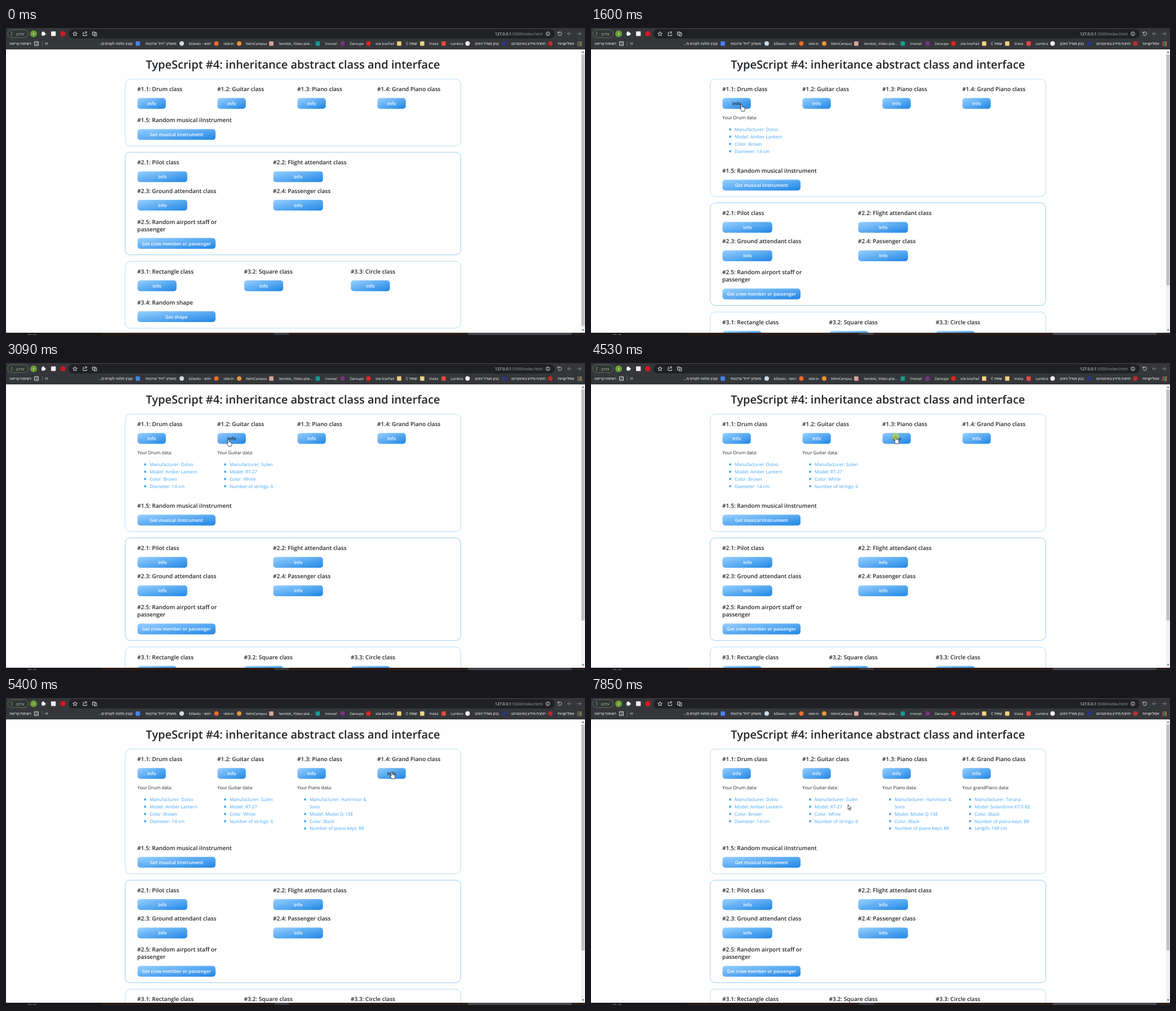
These frames come from a looping animation (1028x545 px, 8 s). An HTML page:

```html
<!DOCTYPE html>
<html lang="en">
<head>
<meta charset="utf-8">
<title>Inheritance, abstract class and interface</title>
<style>
  html, body { margin: 0; width: 100%; height: 100%; overflow: hidden; background: #fefefe; }
  svg { display: block; width: 1028px; height: 545px; }
  text { font-family: "Open Sans", "Liberation Sans", sans-serif; text-rendering: geometricPrecision; white-space: pre; }
  .title { font-size: 20.05px; font-weight: 600; fill: #212529; text-anchor: middle; }
  .head { font-size: 10.1px; font-weight: 600; fill: #212529; }
  .body { font-size: 8.05px; fill: #212529; }
  .item { font-size: 8.1px; fill: #42a5f5; }
  .label { font-size: 8.1px; font-weight: 600; fill: #fff; text-anchor: middle; }
  .bar { font-size: 6.15px; fill: #fff; text-anchor: middle; }
  .rtl { font-size: 6.7px; direction: rtl; }
  .url { font-size: 7px; fill: #fff; }
  .card { fill: #fff; stroke: #a4d6fa; stroke-width: 0.8; }
  .line { fill: none; stroke: #dadce0; stroke-width: 1; }
</style>
</head>
<body>
<svg id="stage" viewBox="0 0 1028 545">
  <defs>
    <linearGradient id="blue" x2="1" y2="1">
      <stop stop-color="#98d0ff"/><stop offset="1" stop-color="#1f86e5"/>
    </linearGradient>
    <linearGradient id="hover" x2="1" y2="1">
      <stop stop-color="#8fcafd"/><stop offset="1" stop-color="#1f84e2"/>
    </linearGradient>
  </defs>
</svg>
<script>
const LOOP = 8000;
const stage = document.getElementById('stage');

function el(parent, tag, attrs = {}, content) {
  const node = document.createElementNS('http://www.w3.org/2000/svg', tag);
  for (const key in attrs) node.setAttribute(key, attrs[key]);
  if (content) node.textContent = content;
  return parent.appendChild(node);
}
const group = () => el(stage, 'g');
const text = (parent, cls, x, y, str, more) => el(parent, 'text', { class: cls, x, y, ...more }, str);
const rect = (parent, x, y, width, height, fill, rx = 0) =>
  el(parent, 'rect', { x, y, width, height, fill, rx });
const dot = (parent, cx, cy, r, fill) => el(parent, 'circle', { cx, cy, r, fill });
const line = (parent, d, more) => el(parent, 'path', { class: 'line', d, ...more });
const card = (parent, y, height, more) =>
  el(parent, 'rect', { class: 'card', x: 211.6, y, width: 595.8, height, rx: 9, ...more });

// Page
const CARD = 118.6;
const upper = group(), lower = group();
const firstCard = card(upper, 90.8, CARD);
const buttons = [];

function button(parent, x, y, w, label) {
  const face = rect(parent, x, y, w, 19.2, 'url(#blue)', 5);
  const caption = text(parent, 'label', x + w / 2, y + 12.8, label);
  buttons.push({ x, y, w, face, caption, moves: parent === lower });
}
function entry(parent, x, y, title, w, label = 'Info') {
  const lines = title.split('|');
  lines.forEach((str, i) => text(parent, 'head', x - 0.4, y + i * 13, str));
  button(parent, x, y + 12.2 + (lines.length - 1) * 13, w, label);
}

text(upper, 'title', 509.5, 72, 'TypeScript #4: inheritance abstract class and interface');
['Drum', 'Guitar', 'Piano', 'Grand Piano'].forEach((name, i) =>
  entry(upper, 233.5 + i * 142, 112, `#1.${i + 1}: ${name} class`, 50.3));

card(lower, 220.7, 182, { style: 'stroke:#80c2f2' });
card(lower, 414.3, CARD);
entry(lower, 233.5, 167.2, '#1.5: Random musical iInstrument', 138.5, 'Get musical iInstrument');
['Pilot', 'Flight attendant', 'Ground attendant', 'Passenger'].forEach((name, i) =>
  entry(lower, 233.5 + (i % 2) * 241, 242.2 + (i >> 1) * 50.5, `#2.${i + 1}: ${name} class`, 88.3));
entry(lower, 233.5, 347.6, '#2.5: Random airport staff or|passenger', 138.5, 'Get crew member or passenger');
['Rectangle', 'Square', 'Circle'].forEach((name, i) =>
  entry(lower, 233.5 + i * 189.4, 435.8, `#3.${i + 1}: ${name} class`, 69.3));
entry(lower, 233.5, 490.6, '#3.4: Random shape', 138.5, 'Get shape');

// Data lists, shown after each click; "|" wraps a line
const LINE = 12.86;
const details = [
  [1600, 'Drum', ['Manufacturer: Dolvo', 'Model: Amber Lantern', 'Color: Brown', 'Diameter: 14 cm']],
  [3010, 'Guitar', ['Manufacturer: Sulen', 'Model: RT-27', 'Color: White', 'Number of strings: 6']],
  [4590, 'Piano', ['Manufacturer: Hartmoor &|Sons', 'Model: Model Q-138', 'Color: Black', 'Number of piano keys: 88']],
  [5930, 'grandPiano', ['Manufacturer: Toruna', 'Model: Solandrine KT-5 B2', 'Color: Black', 'Number of piano keys: 88', 'Length: 149 cm']]
].map(([at, name, items], col) => {
  const list = group(), x = 233.3 + col * 142;
  let y = 183;
  text(list, 'body', x, 161.8, `Your ${name} data:`);
  for (const item of items) {
    rect(list, x + 12, y - 4.6, 3.5, 3.5, '#42a5f5');
    for (const str of item.split('|')) {
      text(list, 'item', x + 21.6, y, str);
      y += LINE;
    }
  }
  return { at, list };
});

// Scroll bar and task bar
const frame = group();
rect(frame, 1021, 38, 7, 503, '#f1f1f1');
const thumb = rect(frame, 1021.5, 47, 6, 482, '#c1c1c1');
el(frame, 'path', { d: 'M1022.6 44L1024.6 41.6L1026.6 44Z', fill: '#505050' });
el(frame, 'path', { d: 'M1022.6 535L1024.6 537.4L1026.6 535Z', fill: '#505050' });
[[0, '#17181b'], [170, '#2b1c17'], [476, '#3b3a3c'], [502, '#2c1d18'], [820, '#43464c'], [1004, '#2a211f']]
  .forEach(([x, fill]) => rect(frame, x, 541, 1028 - x, 4, fill));
text(frame, 'bar', 46, 548.4, '20:40');

// Browser bars
rect(frame, 0, 0, 1028, 38, '#35363a');
rect(frame, 111, 2, 863, 16.5, '#202124', 8);
el(frame, 'rect', { x: 3, y: 3, width: 36.5, height: 14, rx: 7, fill: '#303633', stroke: '#6d7c73', 'stroke-width': 0.8 });
[7.5, 10.2, 12.9].forEach(y => dot(frame, 10, y, 0.7, '#dadce0'));
text(frame, 'bar rtl', 25.5, 12.5, 'עדכון', { style: 'fill:#b4bcb7' });
dot(frame, 49, 10.3, 6, '#689f38');
text(frame, 'bar', 49, 12.4, 'ג');
rect(frame, 63.2, 7.6, 5.8, 5.8, '#f1f3f4', 0.8);
dot(frame, 66, 7.3, 1.4, '#f1f3f4');
dot(frame, 69.2, 10.5, 1.4, '#f1f3f4');
rect(frame, 80, 6, 8.3, 8.3, '#f3efed', 1);
dot(frame, 101, 10.2, 4.6, '#d8171e');
line(frame, 'M122.5 6.3L123.6 9L126.4 9.2L124.2 11L124.9 13.8L122.5 12.3L120.1 13.8L120.8 11L118.6 9.2L121.4 9Z', { 'stroke-width': 0.8 });
line(frame, 'M137 8V13.5H143.2V11M137 8H139M140 6.8H143V9.5M143 6.8L139.5 10.6', { 'stroke-width': 0.9 });
line(frame, 'M153.5 7H158V12.5H153.5ZM158 8.5H160.8V14H156M154.8 9.2H156.8', { 'stroke-width': 0.9 });
const url = text(frame, 'url', 868, 12.8);
el(url, 'tspan', {}, '127.0.0.1');
el(url, 'tspan', { fill: '#9aa0a6' }, ':5500/index.html');
line(frame, 'M958.7 10.2a3.3 3.3 0 1 0 6.6 0a3.3 3.3 0 1 0 -6.6 0M962 9.6V12M962 8.2V8.8', { 'stroke-width': 0.8 });
line(frame, 'M980.6 8.2A3.2 3.2 0 1 1 980.2 11.2M980 6.5V9H982.6', { 'stroke-width': 1.1 });
line(frame, 'M1004 10.2H997M1000.2 7L997 10.2L1000.2 13.4', { style: 'stroke:#85888c' });
line(frame, 'M1014 10.2H1021M1017.8 7L1021 10.2L1017.8 13.4', { style: 'stroke:#85888c' });

// Bookmarks: text centre, text, icon centre, icon colour, round icon
const bookmarks = [
  [194.5, 'קובץ מלווה לקורס מ...', 234, '#4285f4'],
  [275, 'מועדון "זית" צרכנות', 312, '#c9dcea', 1],
  [344.5, 'bDesko - ראשי', 373.5, '#ec6b2d', 1],
  [395.5, 'obkrin', 414, '#e99635', 1],
  [444.5, 'VelmCampus', 471, '#d9a59c'],
  [514.5, 'lemdok_ Video plat...', 553.5, '#0f9c95'],
  [577, 'trovnal', 597.5, '#7b2f87', 1],
  [622.5, 'Zanvupe', 643.5, '#e5231d', 1],
  [672.5, 'site boxPad', 698, '#f3d27a'],
  [720, 'שפת C', 739, '#f3d27a'],
  [759.5, 'Vosta', 777, '#e04a3c'],
  [800.5, 'Lumbra', 819.5, '#f4f4f4', 1],
  [853.5, 'בנק מגדל הזהב', 885, '#2d3580', 1],
  [927.5, 'תחנת מידע באינטרנט', 966.5, '#c22a26', 1],
  [994, 'אפליקציות', 1018],
  [25.5, 'רשימת קריאה', 54]
];
for (const [x, str, cx, fill, round] of bookmarks) {
  const rtl = /^[\u0590-\u05ff]/.test(str);
  text(frame, rtl ? 'bar rtl' : 'bar', x, 29.6, str);
  if (!fill) continue;
  if (round) dot(frame, cx, 27.6, 4, fill);
  else rect(frame, cx - 3.8, 23.8, 7.6, 7.6, fill, 0.8);
}
for (let i = 0; i < 9; i++)
  rect(frame, 1014.4 + (i % 3) * 2.8, 24.2 + Math.floor(i / 3) * 2.8, 1.8, 1.8, ['#e8584b', '#58b56b', '#f0c54a'][i % 3]);
line(frame, 'M50.5 24.2H57.5V31H50.5ZM52 26.2H53M54 26.2H56.2M52 29H53M54 29H56.2', { 'stroke-width': 0.9 });
line(frame, 'M64.5 23.5V32', { style: 'stroke:#5f6368', 'stroke-width': 0.7 });
line(frame, 'M71.8 25.6L69.8 27.6L71.8 29.6M74.4 25.6L72.4 27.6L74.4 29.6', { 'stroke-width': 0.9 });

// Pointer
const pointer = group();
const ring = el(pointer, 'circle', { r: 6.4, fill: '#b2d545', opacity: 0.78 });
const ink = { fill: '#fff', stroke: '#111', 'stroke-width': 0.75, 'stroke-linejoin': 'round' };
const arrow = el(pointer, 'path', { d: 'M0.3 0.4V8.9L2.2 7.1L3.5 10.2L4.9 9.6L3.6 6.6H6.1Z', ...ink });
const hand = el(pointer, 'path', {
  d: 'M-1.2 1.2Q0 -.5 1.2 1.2V4.7Q2.6 4 3 5.2Q4.4 4.6 4.6 5.8Q5.8 5.6 5.8 7V9Q5.8 10.8 4.9 12.4H-.2Q-1.4 10 -2.8 8Q-3.4 6.8 -2.4 6.5L-1.2 7.6Z',
  ...ink
});

// Each move: first step, last step, number of steps, end point
const moves = [
  [280, 280, 1, 941, 490],
  [360, 1050, 9, 280, 152],
  [1130, 1210, 2, 270.5, 144],
  [1360, 1510, 3, 267, 135],
  [1600, 1600, 1, 267.5, 135.5],
  [1680, 2140, 7, 389, 137],
  [2210, 2210, 1, 391, 137],
  [2410, 2410, 1, 389.5, 137],
  [2850, 2850, 1, 395, 135.5],
  [3250, 3800, 8, 541, 131],
  [4670, 5080, 6, 674, 128],
  [5260, 5400, 3, 685, 131],
  [7250, 7330, 2, 685, 133],
  [7560, 7850, 5, 456, 189]
];
const clicks = [[1510, 1600], [2850, 3010], [4530, 4590], [5780, 5930]];
const ease = p => p * p * (3 - 2 * p);

function pointerAt(t) {
  let x = 941, y = 490;
  for (const [start, end, steps, toX, toY] of moves) {
    if (t < start) break;
    const gap = steps > 1 ? (end - start) / (steps - 1) : 1;
    const done = Math.min(steps, Math.floor((t - start + 3) / gap) + 1);
    const p = ease(done / steps);
    x += (toX - x) * p;
    y += (toY - y) * p;
  }
  return [x, y];
}

const show = (node, on) => node.setAttribute('visibility', on ? 'visible' : 'hidden');

function draw(t) {
  const shift = t < 1600 ? 0 : t < 4590 ? 89.8 : 89.8 + LINE;
  lower.setAttribute('transform', `translate(0 ${shift})`);
  firstCard.setAttribute('height', CARD + shift);
  thumb.setAttribute('height', t < 1600 ? 482 : t < 4590 ? 410 : 401);
  details.forEach(d => show(d.list, t >= d.at));

  const [x, y] = pointerAt(t), present = t >= 280;
  let over = false;
  for (const b of buttons) {
    const top = b.y + (b.moves ? shift : 0);
    const hit = present && x >= b.x && x <= b.x + b.w && y >= top && y <= top + 19.2;
    over = over || hit;
    b.face.setAttribute('fill', hit ? 'url(#hover)' : 'url(#blue)');
    b.caption.style.fill = hit ? '#212529' : '';
  }
  pointer.setAttribute('transform', `translate(${x} ${y})`);
  show(arrow, present && !over);
  show(hand, present && over);
  show(ring, clicks.some(([from, to]) => t >= from && t < to));
}

const began = performance.now();
function tick() {
  draw((performance.now() - began) % LOOP);
  requestAnimationFrame(tick);
}
tick();
</script>
</body>
</html>
```
